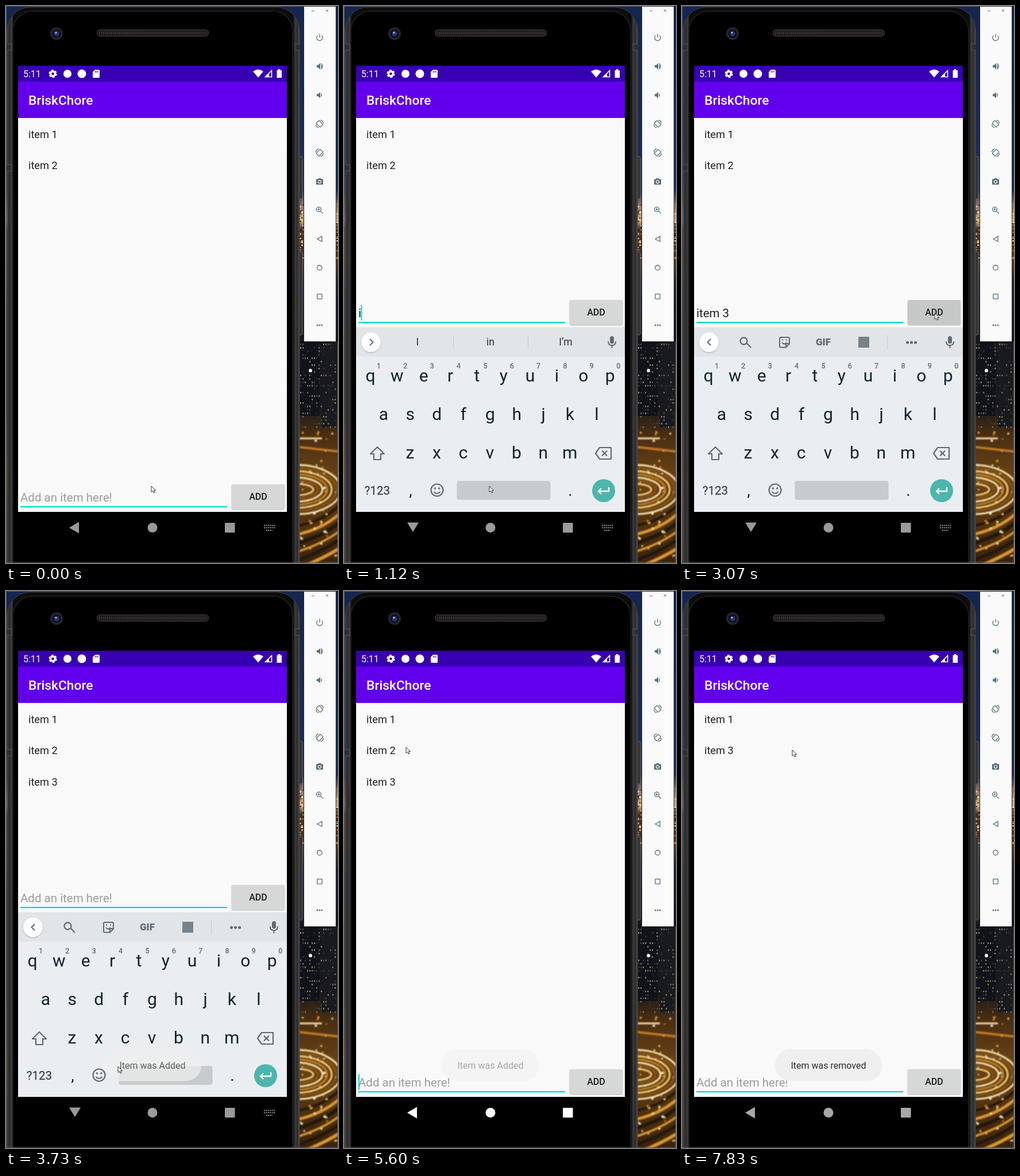
An HTML page that plays this animation: 578x970 px, repeating every 7990 ms.

```html
<!DOCTYPE html>
<html lang="en">
<head>
<meta charset="utf-8">
<title>List demo</title>
<style>
html, body { margin: 0; width: 100%; height: 100%; overflow: hidden; background: #000; }
svg { display: block; }
text { font-family: Roboto, "Noto Sans", sans-serif; white-space: pre; }
.mid { text-anchor: middle; }
.line { fill: none; stroke: currentColor; }
</style>
</head>
<body>
<svg id="stage" width="578" height="970" viewBox="0 0 578 970">
  <defs>
    <linearGradient id="night" x1="0" y1="0" x2="0" y2="970" gradientUnits="userSpaceOnUse">
      <stop offset="0" stop-color="#14254f"/>
      <stop offset=".33" stop-color="#1d2f5c"/>
      <stop offset=".36" stop-color="#9a7a62"/>
      <stop offset=".385" stop-color="#d9b48c"/>
      <stop offset=".4" stop-color="#4a3020"/>
      <stop offset=".46" stop-color="#5a3a1c"/>
      <stop offset=".5" stop-color="#23253a"/>
      <stop offset=".6" stop-color="#15171d"/>
      <stop offset=".72" stop-color="#1c1917"/>
      <stop offset=".77" stop-color="#4a2e12"/>
      <stop offset=".85" stop-color="#6b4314"/>
      <stop offset="1" stop-color="#3a230c"/>
    </linearGradient>
    <linearGradient id="edge">
      <stop offset="0" stop-color="#4c4c4c"/>
      <stop offset=".006" stop-color="#2a2a2a"/>
      <stop offset=".016" stop-color="#3c3c3c"/>
      <stop offset=".022" stop-color="#0c0c0c"/>
      <stop offset=".978" stop-color="#0c0c0c"/>
      <stop offset=".985" stop-color="#3a3a3a"/>
      <stop offset=".994" stop-color="#2c2c2c"/>
      <stop offset="1" stop-color="#5c5c5c"/>
    </linearGradient>
    <filter id="soft"><feGaussianBlur stdDeviation="1.2"/></filter>
    <filter id="shade" x="-10%" y="-20%" width="120%" height="150%">
      <feDropShadow dx="0" dy="1" stdDeviation="1" flood-opacity=".3"/>
    </filter>
  </defs>

  <rect width="578" height="970" fill="url(#night)"/>
  <g id="windows"></g>
  <g id="roads" fill="none" filter="url(#soft)"></g>

  <!-- phone body -->
  <rect x="509" y="262" width="7" height="74" rx="2" fill="#333" stroke="#666"/>
  <rect x="509" y="428" width="7" height="145" rx="2" fill="#333" stroke="#666"/>
  <rect x="2" y="2" width="509" height="1040" rx="40" fill="url(#edge)" stroke="#3f3f3f"/>
  <path d="M2 66h8v11h-8M2 276h8v11h-8M511 66h-8v11h8" fill="#303030" stroke="#595959"/>
  <rect x="12" y="9" width="487" height="1040" rx="34" fill="#000" stroke="#1b1b1b" stroke-width="2"/>
  <rect x="158.500" y="41.500" width="194" height="11" rx="5" fill="#1d1919" stroke="#4b4747"/>
  <path d="M162 47H350" stroke="#383232" stroke-width="5" stroke-dasharray="2 1.500"/>
  <circle cx="88" cy="48" r="11" fill="#24262c"/>
  <circle cx="88" cy="48" r="7.500" fill="#0d1020"/>
  <circle cx="88" cy="48" r="4.500" fill="#29366f"/>
  <circle cx="87" cy="46.500" r="1.600" fill="#a9b9f2"/>

  <!-- emulator controls -->
  <rect x="518.500" y=".5" width="56" height="584" fill="#fafafa" stroke="#20242c"/>
  <path d="M532 8.500h5M557 6l4 4m0-4l-4 4" class="line" color="#777"/>
  <g id="tools" color="#546e7a" fill="#546e7a" stroke-width="1.300"></g>

  <!-- app -->
  <rect x="21" y="104" width="468" height="777" fill="#f9f9f9"/>
  <rect x="21" y="104" width="468" height="28" fill="#3700b3"/>
  <rect x="21" y="131.500" width="468" height="63.500" fill="#6200ee"/>
  <g fill="#fff">
    <text x="30" y="124" font-size="16">5:11</text>
    <g fill="none" stroke="#fff">
      <circle cx="81.500" cy="118" r="4" stroke-width="3.400"/>
      <circle cx="81.500" cy="118" r="6" stroke-width="2.400" stroke-dasharray="3.600 2.683"/>
    </g>
    <circle cx="107" cy="118" r="7"/>
    <circle cx="132" cy="118" r="7.500"/>
    <path d="M155 111h6.500q1.500 0 1.500 1.500v11q0 1.500-1.500 1.500h-9q-1.500 0-1.500-1.500V115z"/>
    <path d="M155.500 113v3m2.300-3v3m2.300-3v3" stroke="#3700b3"/>
    <path d="M430 114q9-7 18 0l-9 10.500z"/>
    <path d="M451.500 123.500L462.500 112.500V123.500z" fill="none" stroke="#fff" stroke-width="1.600"/>
    <path d="M451 124l7-7v7z"/>
    <path d="M471.500 112h2v-2h4v2h2.500v13h-8.500z"/>
    <text x="39" y="172" font-size="22.800" font-weight="500">BriskChore</text>
  </g>
  <g id="items" font-size="18.200" fill="#212121"></g>
  <g id="form">
    <text id="hint" x="25" y="863" font-size="20.500" fill="#9c9c9c">Add an item here!</text>
    <text id="entry" x="25" y="863" font-size="20.500" fill="#212121"></text>
    <rect x="25" y="871" width="360" height="2.200" fill="#03dac5"/>
    <rect id="caret" y="841.500" width="2" height="27" fill="#03dac5"/>
    <rect id="button" x="393" y="833" width="92" height="43" rx="2" filter="url(#shade)"/>
    <text x="439" y="860" font-size="16" font-weight="500" fill="#1c1c1c" class="mid">ADD</text>
  </g>

  <!-- navigation bar -->
  <rect id="ripple" x="65" y="881" width="109" height="55" rx="27" fill="#202020"/>
  <g id="nav">
    <path id="back"/>
    <circle cx="255" cy="908.500" r="8.500"/>
    <rect x="381" y="900" width="17.500" height="17" rx="1"/>
    <path id="switcher" d="M449 904.500h19M449 908.500h19M453 913h11" stroke="#999" stroke-width="2" stroke-dasharray="2 1.400"/>
  </g>

  <g id="keyboard" color="#5f6b72">
    <rect x="21" y="559" width="468" height="2" fill="#000" opacity=".06"/>
    <rect x="21" y="560" width="468" height="321" fill="#ebeef0"/>
    <rect x="21" y="560" width="468" height="50.500" fill="#e1e5e8"/>
    <circle cx="47" cy="585.500" r="17" fill="#fff" filter="url(#shade)"/>
    <path id="chevron" class="line" stroke-width="2"/>
    <g id="toolbar">
      <path d="M113 587.500l7 7.500M113.500 583.500a6 6 0 1 1-12 0a6 6 0 1 1 12 0" class="line" stroke-width="2.300"/>
      <path d="M172 577h13q2 0 2 2v9l-6 6.500h-9q-2 0-2-2v-13.500q0-2 2-2zM181 594v-6h6M174 586q4 5 8 0" class="line" stroke-width="2"/>
      <path d="M174 581.500h2m5 0h2" class="line" stroke-width="2"/>
      <text x="246" y="591" font-size="17" font-weight="900" fill="currentColor" class="mid">GIF</text>
      <rect x="307" y="576" width="19" height="19" fill="#77838a"/>
      <path d="M357.500 573v25" stroke="#c6cbce"/>
      <path d="M392.500 586h.01m7 0h.01m7 0h.01" class="line" stroke-width="5" stroke-linecap="round"/>
    </g>
    <g id="suggest" font-size="17.500" fill="#263238" class="mid">
      <path d="M190.500 575v21M320.500 575v21" stroke="#c6cbce"/>
      <text x="128"/><text x="255"/><text x="386"/>
    </g>
    <rect x="463" y="575" width="7" height="13" rx="3.500" fill="currentColor"/>
    <path d="M460 584q0 7 6.500 7t6.500-7M466.500 591v5" class="line" stroke-width="2"/>
    <g id="keys" class="mid" fill="#10232c"></g>
    <path d="M58 768L70 780H64V790H52V780H46z" class="line" stroke-width="2.200" stroke-linejoin="round"/>
    <path d="M445 769h20v20h-20l-7-10zM449 774.500l9 9m0-9l-9 9" class="line" stroke-width="2.200" stroke-linejoin="round"/>
    <text x="58" y="851" font-size="20.500" fill="#37474f" stroke="#37474f" stroke-width=".3" class="mid">?123</text>
    <circle cx="162" cy="843" r="10.500" class="line" stroke-width="2.200"/>
    <path d="M156.500 846q5.500 6 11 0" class="line" stroke-width="2"/>
    <path d="M158.300 840h.01m7.400 0h.01" class="line" stroke-width="3.400" stroke-linecap="round"/>
    <rect x="196.500" y="827" width="163" height="33" rx="4" fill="#c7cbcd"/>
    <circle cx="452" cy="844" r="20" fill="#4db6ac"/>
    <path d="M461 838v7h-18m5-5l-5 5l5 5" class="line" color="#fff" stroke-width="2.300"/>
  </g>

  <g id="toast">
    <rect y="798" height="55.500" rx="27" fill="#efefef"/>
    <text x="255" y="832" font-size="16" fill="#2b2b2b" class="mid"></text>
  </g>
  <path id="pointer" d="M0 0V10.500L2.500 8.300L4.300 12L6 11.200L4.400 7.600H7.600z" fill="#fff" stroke="#222" stroke-width=".9"/>
  <path d="M0 .5H519M.5 0V970M577.500 584V970M0 969H578" class="line" color="#5d5d5d"/>
</svg>
<script>
const $ = id => document.getElementById(id);
const set = (node, attrs) => { for (const k in attrs) node.setAttribute(k, attrs[k]); };
const LOOP = 7990;

let seed = 11;
const rand = () => (seed = (seed * 16807) % 2147483647) / 2147483647;
const pick = list => list[Math.floor(rand() * list.length)];

function buildCity() {
  let html = '<rect x="511" y="584" width="35" height="130" fill="#101319"/><rect x="549" y="584" width="26" height="150" fill="#191a1f"/>';
  for (let i = 0; i < 170; i++) {
    const x = 512 + Math.floor(rand() * 16) * 4, y = 588 + Math.floor(rand() * 25) * 6;
    html += `<rect x="${x}" y="${y}" width="2.2" height="2.6" fill="${pick(['#4b4b48', '#34363a', '#2a2c33', '#77715f', '#8f8268'])}"/>`;
  }
  for (let i = 0; i < 60; i++) {
    const y = 340 + rand() * 100;
    html += `<rect x="${pick([511, 514, 516, 575])}" y="${y}" width="3" height="2" fill="${pick(['#f4d9b0', '#c98538', '#3a2414', '#fff'])}" opacity=".8"/>`;
  }
  html += '<circle cx="530" cy="635" r="3" fill="#fff"/>';
  $('windows').innerHTML = html;

  let roads = '';
  for (let i = 0; i < 7; i++) {
    roads += `<ellipse cx="505" cy="842" rx="${30 + i * 8}" ry="${10 + i * 5.5}" stroke="${['#f9d57c', '#8d5613', '#ffe9ae', '#c98523'][i % 4]}" stroke-width="3"/>`;
  }
  for (let i = 0; i < 6; i++) {
    roads += `<path d="M508 ${905 + i * 15}Q550 ${898 + i * 13} 580 ${870 + i * 15}" stroke="${i % 2 ? '#d99632' : '#241407'}" stroke-width="${4 + i % 3}"/>`;
  }
  roads += '<path d="M510 753H550" stroke="#ffe2a4" stroke-width="3"/><path d="M510 768L580 776" stroke="#c07b25" stroke-width="4"/>';
  for (let i = 0; i < 45; i++) {
    roads += `<circle cx="${512 + rand() * 64}" cy="${735 + rand() * 225}" r="${.7 + rand() * 1.6}" fill="${pick(['#ffe6a6', '#f0a93e', '#fff4d6'])}"/>`;
  }
  $('roads').innerHTML = roads;
}

function buildTools() {
  const speaker = '<path d="M-5-2h2.500l3.500-3.500v11L-2.500 2H-5z"/>';
  const wave = '<path class="line" d="M2.500-2.500q2 2.500 0 5"/>';
  const turn = '<rect class="line" x="-3.500" y="-5" width="7" height="10" rx="1" transform="rotate(-45)"/><path class="line" d="M-6.500 1q.5 5 5 5.500M6.500-1q-.5-5-5-5.500"/>';
  const icons = [
    '<path class="line" d="M-3.600-3.600A5.200 5.200 0 1 0 3.600-3.600M0-6.500V0"/>',
    speaker + wave + '<path class="line" d="M2.500-5q5.500 5 0 10"/>',
    speaker + wave,
    turn,
    `<g transform="scale(-1 1)">${turn}</g>`,
    '<path d="M-6-4h3l1-1.500h4L3-4h3V5.500H-6z"/><circle cy=".7" r="2.600" fill="none" stroke="#fafafa"/>',
    '<path class="line" d="M1.500 1.500L6 6M-3.500-1.500h4M-1.500-3.500v4"/><circle class="line" cx="-1.500" cy="-1.500" r="4"/>',
    '<path class="line" d="M-4 0L4-4.500V4.500z"/>',
    '<circle class="line" r="4.300"/>',
    '<rect class="line" x="-4.200" y="-4.200" width="8.400" height="8.400" rx=".8"/>',
    '<circle cx="-4" r="1.400"/><circle r="1.400"/><circle cx="4" r="1.400"/>'
  ];
  $('tools').innerHTML = icons.map((d, i) => `<g transform="translate(546 ${55 + i * 50.1})">${d}</g>`).join('');
}

function buildKeys() {
  const label = (x, y, size, s, extra = '') => `<text x="${x}" y="${y}" font-size="${size}" ${extra}>${s}</text>`;
  const row = (letters, x, y) => [...letters].map((c, i) => label(x + i * 46.35, y, 30, c)).join('');
  $('keys').innerHTML = row('qwertyuiop', 46, 654) + row('asdfghjkl', 69, 720.5) + row('zxcvbnm', 115, 787.5)
    + [...'1234567890'].map((c, i) => label(60.5 + i * 46.35, 631, 12.5, c, 'fill="#5f6b72" stroke="#5f6b72" stroke-width=".3"')).join('')
    + label(116, 853, 28, ',') + label(394, 853, 28, '.');
}

buildCity();
buildTools();
buildKeys();
$('items').innerHTML = [1, 2, 3].map(n => `<text x="39">item ${n}</text>`).join('');

const ticks = [0, 130, 250, 390, 690, 1120, 1250, 1390, 1530, 1660,
  2090, 2230, 2370, 2510, 2650, 2790, 2930, 3070,
  3220, 3350, 3470, 3600, 3730, 3910, 4060, 4210, 4360, 4500, 4650, 4800,
  5070, 5210, 5340, 5470, 5600, 5750, 6170,
  6750, 6900, 7050, 7200, 7350, 7500, 7660, 7830];
const pointerPath = [[0, 253, 836], [1660, 253, 836], [2090, 262, 815], [2370, 345, 640], [2650, 420, 480],
  [2790, 443, 434], [2930, 445, 490], [3070, 440, 535], [3350, 440, 537], [3600, 270, 760], [3730, 195, 828],
  [3910, 135, 905], [4060, 118, 951], [4210, 121, 935], [4360, 122, 929], [4800, 122, 929], [5070, 122, 905],
  [5210, 118, 680], [5340, 111, 420], [5470, 108, 285], [5600, 108, 272], [7050, 108, 272], [7500, 180, 282], [7660, 192, 277]];
const typing = [[0, ''], [1120, 'i'], [1250, 'it'], [1390, 'item'], [1530, 'item '], [1660, 'item 3'], [3220, '']];
const blink = [[0, 0], [390, 1], [690, 0], [1120, 1], [2090, 0], [2650, 1], [3070, 0], [3220, 1], [3600, 0],
  [4060, 1], [4500, 0], [5470, 1], [6170, 0], [6750, 1], [7200, 0], [7660, 1], [7830, 0]];
const toastAlpha = [[3470, 0], [3600, .3], [3730, .7], [3910, 1], [5470, 1], [5600, .4], [5750, 0],
  [6750, 0], [6900, .4], [7050, .8], [7200, 1]];
const navShade = [[4210, 154], [4500, 180], [4650, 192], [4800, 255], [6750, 255], [7200, 168]];
const words = { i: ['I', 'in', 'I\u2019m'], it: ['its', 'it', 'item'], item: ['items', 'item', 'itemized'], 'item ': ['is', 'number', 'in the'] };

const latest = (list, t) => list.filter(e => e[0] <= t).pop()[1];
function along(list, t, k = 1) {
  const i = list.findIndex(e => e[0] > t);
  if (i < 0) return list[list.length - 1][k];
  if (i === 0) return list[0][k];
  const a = list[i - 1], b = list[i];
  return a[k] + (b[k] - a[k]) * (t - a[0]) / (b[0] - a[0]);
}
const ramp = (t, from, to) => Math.min(1, Math.max(0, (t - from) / (to - from)));
const show = (id, on) => set($(id), { visibility: on ? 'visible' : 'hidden' });

function draw(time) {
  const t = ticks.filter(k => k <= time).pop();
  const open = t >= 130 && t < 4800;
  const raised = t >= 250 && t < 4650;

  const removed = ramp(t, 6750, 7050);
  const rowY = [229.5, 284, 338.5 - 54.5 * ramp(t, 6900, 7200)];
  const rowAlpha = [1, 1 - removed, ramp(t, 3220, 3470)];
  [...$('items').children].forEach((row, i) => set(row, { y: rowY[i], opacity: rowAlpha[i] }));

  const value = latest(typing, t);
  $('entry').textContent = value;
  show('hint', !value);
  set($('form'), { transform: `translate(0 ${raised ? -321 : 0})` });
  show('caret', latest(blink, t));
  set($('caret'), { x: value ? 24.5 + $('entry').getComputedTextLength() : 25 });
  set($('button'), { fill: t >= 3070 && t < 3470 ? '#c6c8c8' : '#d6d7d7' });

  show('keyboard', open);
  set($('keyboard'), {
    transform: `translate(0 ${raised ? 0 : t < 250 ? 14 : 6})`,
    opacity: raised ? 1 : t < 250 ? .6 : .92
  });
  const hints = words[value];
  set($('toolbar'), { display: hints ? 'none' : 'inline' });
  set($('suggest'), { display: hints ? 'inline' : 'none' });
  set($('chevron'), { d: hints ? 'M45 580l5.500 5.500l-5.500 5.500' : 'M50 580l-5.500 5.500l5.500 5.500' });
  if (hints) $('suggest').querySelectorAll('text').forEach((node, i) => { set(node, { y: 591 }); node.textContent = hints[i]; });

  const shade = Math.round(along(navShade, t));
  set($('nav'), { fill: `rgb(${shade},${shade},${shade})` });
  set($('back'), { d: open ? 'M110 899.500H130L120 916z' : 'M110 908.500L127 898.500V918.500z' });
  show('switcher', t < 4060);
  show('ripple', t >= 4360 && t < 4800);

  const late = t >= 6750, width = late ? 186 : 170;
  set($('toast'), { opacity: along(toastAlpha, t) });
  set($('toast').children[0], { x: 255 - width / 2, width });
  $('toast').children[1].textContent = late ? 'Item was removed' : 'Item was Added';

  set($('pointer'), { transform: `translate(${along(pointerPath, t)} ${along(pointerPath, t, 2)})` });
}

const start = performance.now();
function frame() {
  draw((performance.now() - start) % LOOP);
  requestAnimationFrame(frame);
}
frame();
</script>
</body>
</html>
```
